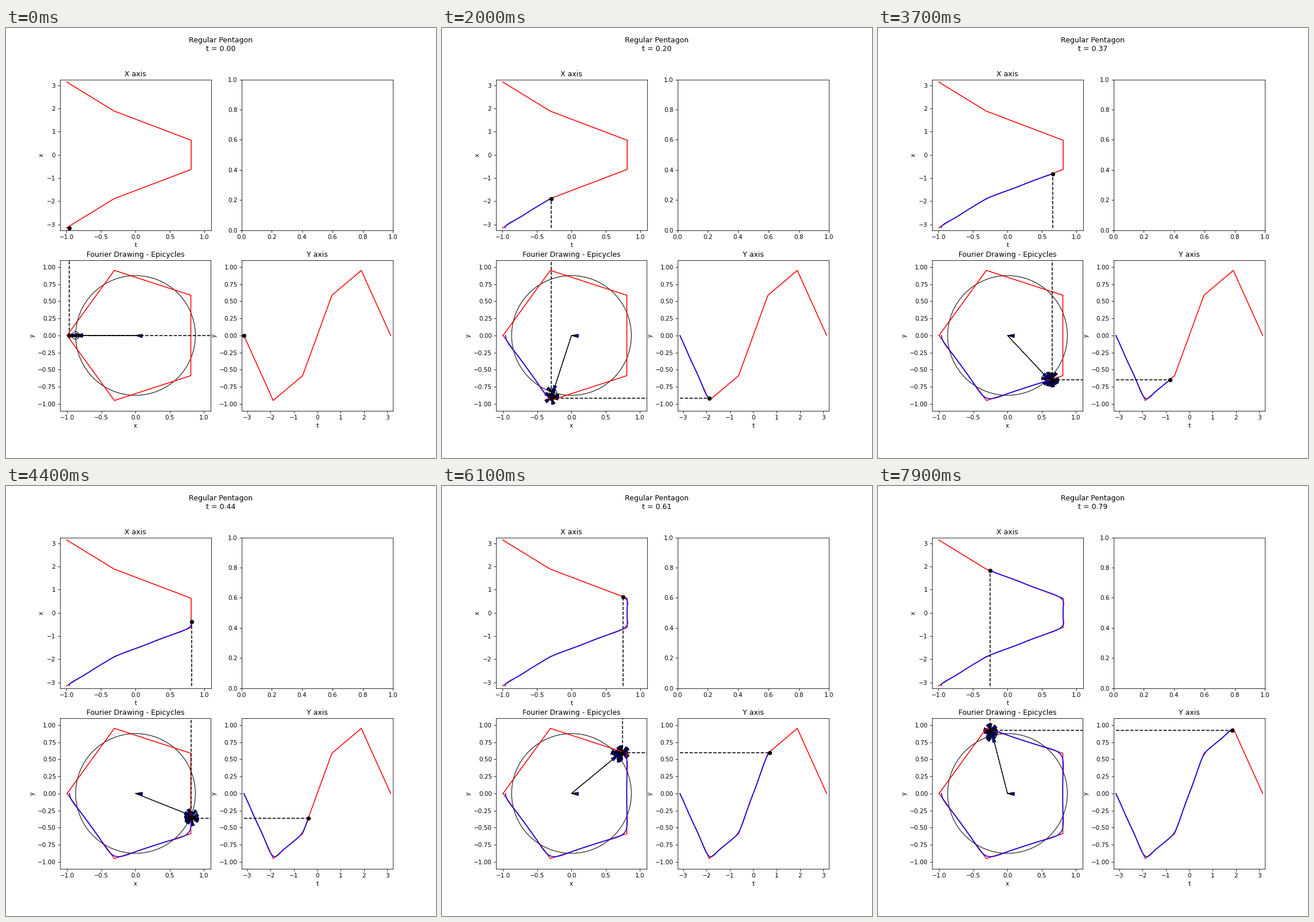
A matplotlib script that plays this animation: 748 by 748 pixels, repeating every 8000 ms.

```python
import numpy as np
import matplotlib.pyplot as plt
from matplotlib.animation import FuncAnimation
from matplotlib.patches import Circle, FancyArrow

FRAMES, STEPS, ORDER = 80, 100, 10
PI = np.pi
LIM, T_LIM = 1.1, PI + 0.1
TINY = 1e-5


def coefficient(n):
    """Fourier coefficient of the unit pentagon; the vanishing ones keep a tiny residue."""
    if n == 0:
        return TINY * np.exp(1j * np.radians(176))
    size = (np.sin(PI / 5) / (PI / 5) / n) ** 2 if n % 5 == 1 else TINY
    return size if n % 2 else -size


# Arms are chained as 0, 1, -1, 2, -2, ...
freqs = [0] + [s * k for k in range(1, ORDER + 1) for s in (1, -1)]
coefs = np.array([coefficient(n) for n in freqs])

times = -PI + 2 * PI * np.arange(FRAMES) / STEPS
arms = coefs * np.exp(1j * np.outer(times, freqs))
joints = np.cumsum(arms, axis=1)
path = joints[:, -1]

corner_t = np.linspace(-PI, PI, 6)
corner_x, corner_y = np.cos(corner_t), np.sin(corner_t)

fig, axes = plt.subplots(2, 2, figsize=(10, 10), dpi=74.8)
ax_x, ax_draw, ax_y = axes[0, 0], axes[1, 0], axes[1, 1]
title = fig.suptitle("")


def setup(ax, name, labels, xlim, ylim, xs, ys):
    ax.set_title(name)
    ax.set_xlabel(labels[0])
    ax.set_ylabel(labels[1])
    ax.set_xlim(-xlim, xlim)
    ax.set_ylim(-ylim, ylim)
    ax.plot(xs, ys, "r")
    trace, = ax.plot([], [], "b")
    dot, = ax.plot([], [], "ko")
    return trace, dot


def guide(ax):
    return ax.plot([], [], "k--")[0]


x_trace, x_dot = setup(ax_x, "X axis", "tx", LIM, T_LIM, corner_x, corner_t)
d_trace, d_dot = setup(ax_draw, "Fourier Drawing - Epicycles", "xy", LIM, LIM,
                       corner_x, corner_y)
y_trace, y_dot = setup(ax_y, "Y axis", "ty", T_LIM, LIM, corner_t, corner_y)
ax_draw.set_aspect("equal")

x_guide, y_guide = guide(ax_x), guide(ax_y)
up_guide, right_guide = guide(ax_draw), guide(ax_draw)

circles, arrows = [], []
for c in coefs:
    if abs(c) > TINY * 2:
        circles.append(ax_draw.add_patch(Circle((0, 0), abs(c), fill=False)))
    else:
        circles.append(None)
    arrows.append(ax_draw.add_patch(FancyArrow(
        0, 0, c.real, c.imag, width=0.001, head_width=0.05, head_length=0.1,
        length_includes_head=True, fc="blue", ec="black")))


def update(i):
    t, x, y = times[i], path[i].real, path[i].imag
    title.set_text(f"Regular Pentagon\nt = {i / STEPS:.2f}")

    base = 0j
    for arm, tip, circle, arrow in zip(arms[i], joints[i], circles, arrows):
        if circle:
            circle.center = base.real, base.imag
        arrow.set_data(x=base.real, y=base.imag, dx=arm.real, dy=arm.imag)
        base = tip

    past, past_t = path[:i + 1], times[:i + 1]
    x_trace.set_data(past.real, past_t)
    d_trace.set_data(past.real, past.imag)
    y_trace.set_data(past_t, past.imag)

    x_dot.set_data([x], [t])
    d_dot.set_data([x], [y])
    y_dot.set_data([t], [y])

    x_guide.set_data([x, x], [-PI, t])
    y_guide.set_data([-PI, t], [y, y])
    up_guide.set_data([x, x], [y, LIM])
    right_guide.set_data([x, LIM], [y, y])


anim = FuncAnimation(fig, update, frames=FRAMES, init_func=lambda: update(0),
                     interval=100, repeat=True, repeat_delay=0)
plt.show()
```
